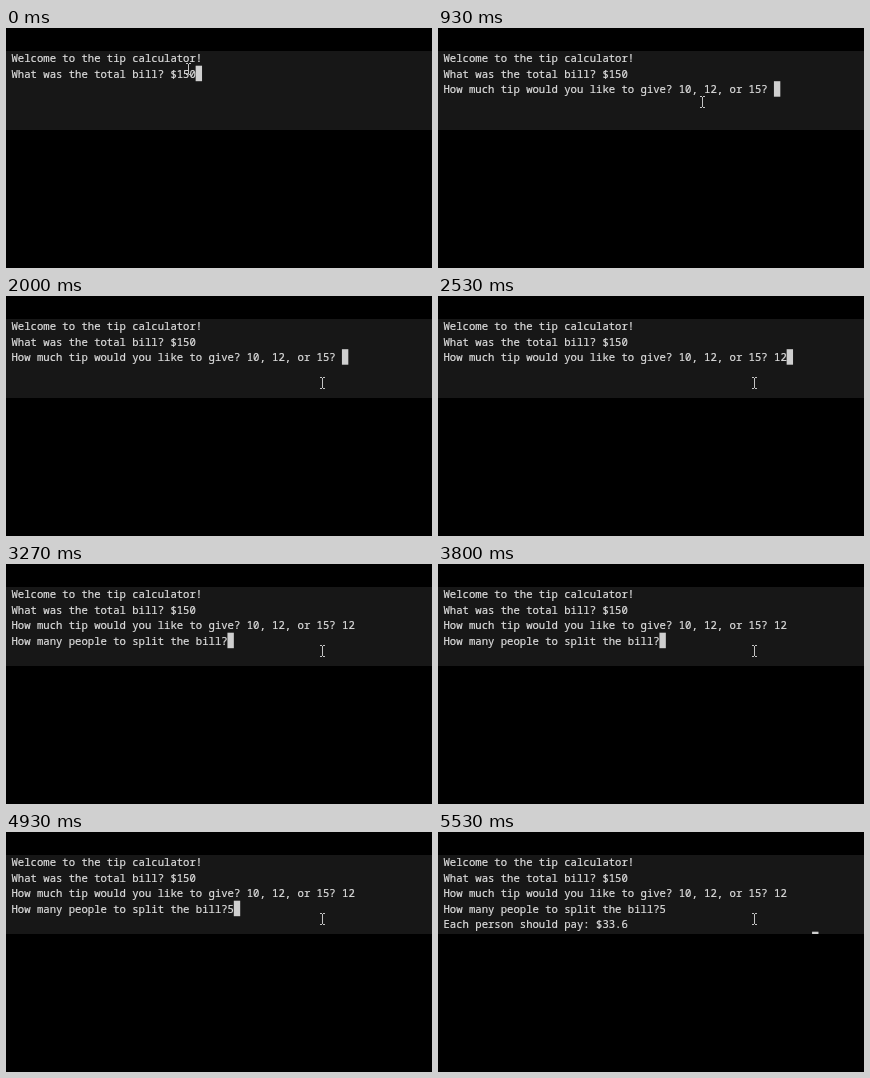
An HTML page for the animation above (5.59 s loop, 426x240 px).

```html
<!DOCTYPE html>
<html lang="en">
<head>
<meta charset="utf-8">
<title>Tip calculator</title>
<style>
  html, body { margin: 0; width: 100%; height: 100%; overflow: hidden; background: #000; }
  svg { display: block; }
  text { font: 500 10.6px "Noto Sans Mono", "DejaVu Sans Mono", monospace; fill: #dedede; stroke: #dedede; stroke-width: .2; }
</style>
</head>
<body>
<svg width="426" height="240" viewBox="0 0 426 240">
  <clipPath id="panel"><rect y="23" width="426" height="79"/></clipPath>
  <g clip-path="url(#panel)">
    <rect y="23" width="426" height="79" fill="#171717"/>
    <g id="lines"></g>
    <rect id="caret" width="6.4" height="15.5" fill="#cfcfcf"/>
    <path id="mouse" d="M-2.5-5H-.5M.5-5H2.5M0-4.5V5.5M-2.5 6H-.5M.5 6H2.5" fill="none" stroke="#c4c4c4"/>
  </g>
</svg>
<script>
const LOOP = 5590, STEP = 200 / 3;
const LEFT = 5.5, CELL = 6.36, ROW = 15.5, TOP = 22.2, BASE = 34.1;
const $ = id => document.getElementById(id);

const intro = ["Welcome to the tip calculator!", "What was the total bill? $150"];
const askTip = "How much tip would you like to give? 10, 12, or 15? ";
const askPeople = "How many people to split the bill?";
const result = "Each person should pay: $33.6";

// Each state: start time, lines below the intro, caret column and row
const states = [
  [0, [], 29, 1],
  [400, [askTip], 52, 2],
  [2130, [askTip + "1"], 53, 2],
  [2330, [askTip + "12"], 54, 2],
  [2930, [askTip + "12", askPeople], 34, 3],
  [4800, [askTip + "12", askPeople + "5"], 35, 3],
  [5200, [askTip + "12", askPeople + "5", result], 58, 5]
];

// Pointer path: time, x, y
const path = [[0, 182, 40], [930, 264, 73], [1400, 316, 86], [LOOP, 316, 86]];

const rows = Array.from({ length: 5 }, (_, i) => {
  const row = document.createElementNS("http://www.w3.org/2000/svg", "text");
  row.setAttribute("x", LEFT);
  row.setAttribute("y", BASE + i * ROW);
  return $("lines").appendChild(row);
});

function pointer(t) {
  const i = path.findIndex(p => p[0] > t);
  const [t0, x0, y0] = path[i - 1], [t1, x1, y1] = path[i];
  const k = (t - t0) / (t1 - t0);
  return [x0 + (x1 - x0) * k, y0 + (y1 - y0) * k].map(v => Math.floor(v) + 0.5);
}

let shown;
function draw(now) {
  const step = Math.min(83, Math.floor((now % LOOP + 4) / STEP));
  if (step !== shown) {
    shown = step;
    const t = step * STEP;
    const [, extra, col, line] = states.filter(s => s[0] <= t + 4).pop();
    const text = [...intro, ...extra];
    rows.forEach((row, i) => row.textContent = text[i] || "");
    $("caret").setAttribute("x", LEFT + col * CELL - 0.3);
    $("caret").setAttribute("y", TOP + line * ROW);
    $("mouse").setAttribute("transform", `translate(${pointer(t)})`);
  }
  requestAnimationFrame(draw);
}
draw(0);
</script>
</body>
</html>
```
